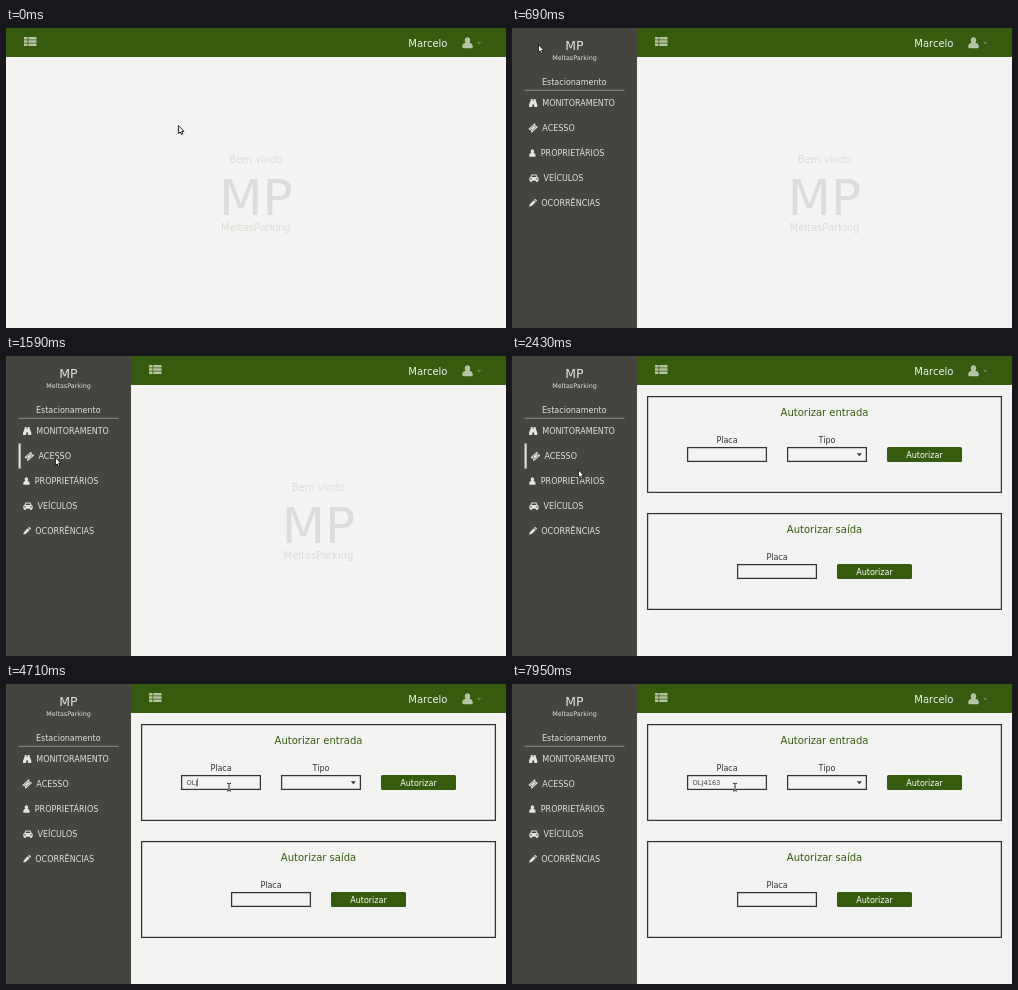
Animation, 500 px wide and 300 px high, one loop 8000 ms. Source, as an HTML page:

```html
<!DOCTYPE html>
<html lang="pt">
<head>
<meta charset="utf-8">
<title>Estacionamento</title>
<style>
  html, body { margin: 0; width: 100%; height: 100%; overflow: hidden; background: #f3f3f1; }
  svg { display: block; width: 500px; height: 300px; }
  text { font-family: "DejaVu Sans", Verdana, sans-serif; font-size: 8px; white-space: pre; }
  .mid { text-anchor: middle; }
  .big { font-size: 10px; }
  .welcome { fill: #dcdcda; }
  .side { fill: #e2e2df; }
  .green { fill: #355b0f; }
  .label { fill: #333; }
  .box { fill: none; stroke: #333; stroke-width: 1.25; }
  .btn { fill: #fff; }
</style>
</head>
<body>
<svg viewBox="0 0 500 300">
  <defs>
    <path id="person" d="M5.5 0a2.9 3.2 0 0 1 1.9 5.5q3.4.5 3.4 4q0 1.5-1.5 1.5H1.7q-1.5 0-1.5-1.5q0-3.500 3.400-4A2.900 3.200 0 0 1 5.500 0z"/>
  </defs>
  <rect width="500" height="300" fill="#f3f3f1"/>

  <g id="welcome" class="welcome">
    <text class="mid big" x="250" y="135">Bem vindo</text>
    <text class="mid" x="250" y="186.500" style="font-size:50px">MP</text>
    <text class="mid big" x="250" y="203">MeltasParking</text>
  </g>

  <g id="forms">
    <rect class="box" x="135.600" y="40.600" width="353.800" height="95.800"/>
    <text class="mid big green" x="312.500" y="60">Autorizar entrada</text>
    <text class="mid label" x="215" y="86.500">Placa</text>
    <text class="mid label" x="315" y="86.500">Tipo</text>
    <rect class="box" x="175.600" y="91.600" width="78.800" height="13.800"/>
    <rect class="box" x="275.600" y="91.600" width="78.800" height="13.800"/>
    <path d="M344.800 97.300h5l-2.500 3z" fill="#333"/>
    <rect class="green" x="375" y="91" width="75" height="15" rx="1.500"/>
    <text class="mid btn" x="412.500" y="101.700">Autorizar</text>
    <text id="plate" x="180.500" y="101.200" fill="#444" style="font-size:6.670px"></text>
    <rect id="caret" y="94.500" width=".7" height="8" fill="#444"/>

    <rect class="box" x="135.600" y="157.600" width="353.800" height="95.800"/>
    <text class="mid big green" x="312.500" y="177">Autorizar saída</text>
    <text class="mid label" x="265" y="203.500">Placa</text>
    <rect class="box" x="225.600" y="208.600" width="78.800" height="13.800"/>
    <rect class="green" x="325" y="208" width="75" height="15" rx="1.500"/>
    <text class="mid btn" x="362.500" y="218.700">Autorizar</text>
  </g>

  <rect class="green" width="500" height="29"/>
  <path id="menu" d="M18 9h3.500v2.500h-3.500zM22.300 9h8.200v2.500h-8.200zM18 12.300h3.500v2.500h-3.500zM22.300 12.300h8.200v2.500h-8.200zM18 15.600h3.500v2.500h-3.500zM22.300 15.600h8.200v2.500h-8.200z"/>
  <text class="big" x="402.300" y="18.600" fill="#f0f3ec">Marcelo</text>
  <use href="#person" x="456" y="9.300" fill="#b7c4a8"/>
  <path d="M471 14h4.400l-2.200 2.300z" fill="#708a55"/>

  <g id="sidebar">
    <rect width="125" height="300" fill="#45443f"/>
    <text class="mid side" x="62.500" y="21.700" style="font-size:12.500px">MP</text>
    <text class="mid side" x="62.500" y="31.700" style="font-size:6.400px">MeltasParking</text>
    <text class="mid side" x="62.300" y="56.500">Estacionamento</text>
    <path d="M12.500 62.300h100" stroke="#8b8a86"/>
    <g class="side">
      <path d="M18.700 71h2v1.500h1V71h2v1.500l1.600 4.200V79h-3.200v-2.500h-1.800V79H17v-2.300l1.700-4.200z"/>
      <text x="30.300" y="78">MONITORAMENTO</text>
    </g>
    <g id="access" class="side">
      <path transform="rotate(-42 21.200 100)" d="M17 97.500h8.400v1.500a1 1 0 0 0 0 2v1.500H17V101a1 1 0 0 0 0-2z"/>
      <path transform="rotate(-42 21.200 100)" d="M19 98.600h4.400v2.800H19z" fill="none" stroke="#45443f" stroke-width=".5"/>
      <text x="30.300" y="103">ACESSO</text>
    </g>
    <rect id="bar" x="12.500" y="87.500" width="2.200" height="25" fill="#dcdcda"/>
    <g class="side">
      <use href="#person" transform="translate(17 121.200) scale(.62 .68)"/>
      <text x="28.800" y="128">PROPRIETÁRIOS</text>
    </g>
    <g class="side">
      <path d="M19.500 146.500h5l1 2.500q1.200.3 1.200 1.600v2.200h-.8v1.200h-1.700v-1.200h-4.400v1.200h-1.700v-1.200h-.8v-2.200q0-1.300 1.200-1.600z"/>
      <path d="M20.200 147.500h3.600l.6 1.600h-4.800zM18.300 150.300h1.400v1.100h-1.400zM24.300 150.300h1.400v1.100h-1.400z" fill="#45443f"/>
      <text x="31.500" y="153">VEÍCULOS</text>
    </g>
    <g class="side">
      <path d="M17.300 178.600l.5-2.400 3.900-3.900 1.900 1.900-3.900 3.900zM22.200 171.800l.6-.6q.5-.4 1 0l.9.900q.4.500 0 1l-.6.600z"/>
      <text x="29.300" y="178">OCORRÊNCIAS</text>
    </g>
  </g>

  <path id="arrow" d="M.4.500v8l1.800-1.600 1.300 2.700 1.300-.6-1.200-2.600h2.400z" fill="#fff" stroke="#111" stroke-width=".9"/>
  <g id="beam" fill="none" transform="translate(223 103.200)">
    <path d="M-2-3.800h1.400l.6.600.6-.6H2M0-3.200v6.400M-2 3.800h1.400l.6-.6.6.6H2" stroke="#fff" stroke-width="1.800"/>
    <path d="M-2-3.800h1.400l.6.600.6-.6H2M0-3.200v6.400M-2 3.800h1.400l.6-.6.6.6H2" stroke="#111" stroke-width=".95"/>
  </g>
</svg>
<script>
  const LOOP = 8000, TICK = 60;
  const OPEN = 690, FORMS = 2190, IN_FIELD = 2990;

  // pointer legs: time and place; eased legs start and end at rest
  const path = [
    { t: -30, x: 172, y: 97, ease: true },
    { t: 450, x: 26, y: 16 },
    { t: OPEN, x: 26, y: 16, ease: true },
    { t: 1290, x: 49, y: 101 },
    { t: 2370, x: 49, y: 101 },
    { t: 2550, x: 100, y: 138 },
    { t: 2700, x: 178, y: 144 },
    { t: 2850, x: 270, y: 118 },
    { t: 2970, x: 236, y: 106 },
    { t: 3030, x: 223, y: 103 }
  ];

  // time, plate text, caret shown
  const typing = [
    [0, "", false], [3210, "", true], [3930, "O", true], [4290, "OL", true],
    [4710, "OLJ", true], [5130, "OLJ", false], [5430, "OLJ4", true],
    [5730, "OLJ41", true], [6030, "OLJ418", true], [6510, "OLJ41", true],
    [6990, "OLJ41", false], [7350, "OLJ416", true], [7470, "OLJ4163", true],
    [7950, "OLJ4163", false]
  ];

  const el = id => document.getElementById(id);
  const [welcome, forms, menu, sidebar, access, bar, plate, caret, arrow, beam] =
    ["welcome", "forms", "menu", "sidebar", "access", "bar", "plate", "caret", "arrow", "beam"].map(el);
  const show = (node, on) => node.setAttribute("visibility", on ? "visible" : "hidden");
  const move = (node, x, y = 0) => node.setAttribute("transform", `translate(${x} ${y})`);
  const within = (t, a, b) => t >= a && t < b;

  function pointer(t) {
    const i = path.findLastIndex(p => p.t <= t);
    const a = path[i], b = path[i + 1];
    if (!b) return a;
    let k = (t - a.t) / (b.t - a.t);
    if (a.ease) k = k * k * (3 - 2 * k);
    return { x: a.x + (b.x - a.x) * k, y: a.y + (b.y - a.y) * k };
  }

  function draw(t) {
    const open = t >= OPEN;
    const hover = within(t, 1590, FORMS) || within(t, 2430, 2490);
    const p = pointer(Math.floor((t - 30) / TICK) * TICK + 30);
    const overMenu = !open && p.x < 34 && p.y < 24;

    show(sidebar, open);
    show(welcome, t < FORMS);
    show(forms, t >= FORMS);
    move(welcome, open ? 62.5 : 0);
    move(menu, open ? 125 : 0);
    menu.setAttribute("fill", overMenu ? "#f4f6f1" : "#b7c4a8");

    show(bar, hover);
    move(access, hover ? 2.2 : 0, hover ? 0.4 : 0);

    const [, text, blink] = typing.findLast(s => s[0] <= t);
    if (plate.textContent !== text) plate.textContent = text;
    caret.setAttribute("x", 180.2 + (text ? plate.getComputedTextLength() : 0));
    show(caret, blink);

    show(arrow, t < IN_FIELD);
    show(beam, t >= IN_FIELD);
    move(arrow, p.x, p.y);
  }

  const start = performance.now();
  function frame() {
    draw((performance.now() - start) % LOOP);
    requestAnimationFrame(frame);
  }
  frame();
</script>
</body>
</html>
```
